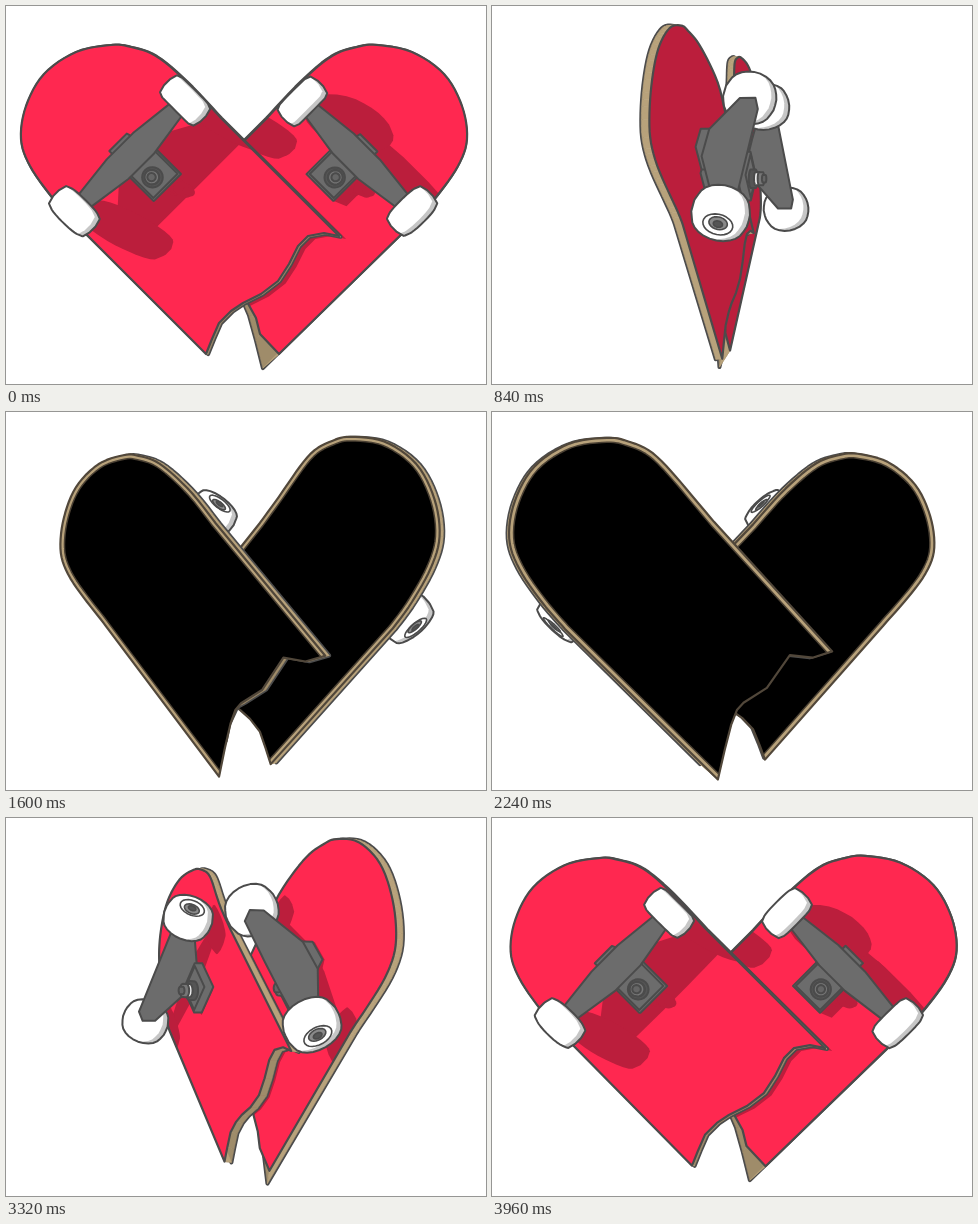
Animation, 480 px wide and 378 px high, one loop 4 s. Source, as an HTML page with a canvas:

```html
<!DOCTYPE html>
<html lang="en">
<head>
<meta charset="utf-8">
<title>Broken board heart</title>
<style>
html, body { margin: 0; width: 100%; height: 100%; overflow: hidden; background: #fff; }
canvas { display: block; }
</style>
</head>
<body>
<canvas id="stage" width="480" height="378"></canvas>
<script>
const ctx = document.getElementById('stage').getContext('2d');
const LOOP = 4000, STEP = 40;
const CX = 238, CY = 190, CAMERA = 1200, THICK = 7;
const INK = '#4b4b4b', RED = '#ff2850', SHADE = '#bb1e3c', WOOD = '#b8a27b',
      SPLIT = '#9f8c6a', METAL = '#6c6c6c', GREY = '#c6c6c6';
const LIGHT = [-1.5, -0.6, 1];
let cos = 1, sin = 0;

// Outlines are given for the left board; the right one is mirrored.
const NOSE = [[215, 112], [180, 75], [150, 50], [125, 41], [105, 39], [70, 46], [38, 68],
  [20, 100], [15, 133], [24, 160], [45, 190], [67, 215]];
const LEFT_BREAK = [[200, 348], [206, 333], [213, 317], [225, 305], [237, 297], [255, 288],
  [272, 275], [283, 258], [292, 240], [302, 230], [318, 227], [333, 230]];
const RIGHT_TAIL = [[246, 289], [271, 275], [296, 243], [321, 246], [343, 240]];
const RIGHT_FRONT = [[203, 348], [222, 328], [226, 312], [236, 294], ...RIGHT_TAIL];
const RIGHT_BACK = [[219, 363], [226, 335], [233, 310], [239, 296], ...RIGHT_TAIL];

function smooth(pts, n = 6) {
  const out = [];
  for (let i = 0; i < pts.length - 1; i++) {
    const p = [i - 1, i, i + 1, i + 2].map(k => pts[Math.min(pts.length - 1, Math.max(0, k))]);
    for (let k = 0; k < n; k++) {
      const t = k / n;
      out.push([0, 1].map(d => 0.5 * (2 * p[1][d] + (p[2][d] - p[0][d]) * t
        + (2 * p[0][d] - 5 * p[1][d] + 4 * p[2][d] - p[3][d]) * t * t
        + (3 * p[1][d] - p[0][d] - 3 * p[2][d] + p[3][d]) * t * t * t)));
    }
  }
  return [...out, pts[pts.length - 1]];
}

// Deck surface height: flat, easing into a nose set back from the wheels.
function surface(board, x, y) {
  const t = Math.min(1, Math.max(0, (290 - (board.side * x + CX + y + CY)) / 140));
  return board.z - 12.5 * t * t * (3 - 2 * t);
}

function makeBoard(side, z, frontBreak, backBreak) {
  const board = { side, z, cut: frontBreak.length };
  const nose = smooth(NOSE);
  const place = depth => ([px, py]) => {
    const x = side * (px - CX), y = py - CY;
    const height = surface(board, x, y), unscale = 1 - height / CAMERA;
    return [x * unscale, y * unscale, height - depth];
  };
  board.front = [...frontBreak, ...nose].map(place(0));
  board.back = [...backBreak, ...nose].map(place(THICK));
  board.parts = makeTruck(board);
  return board;
}

// Truck space: a along the axle, b towards the break, h above the deck.
function makeTruck(board) {
  const at = (a, b, h) => [board.side * (-111 + (a + b) * Math.SQRT1_2),
    -39 + (b - a) * Math.SQRT1_2, board.z + h];
  const box = (a0, a1, b0, b1, h0, h1) => [h0, h1].flatMap(h =>
    [at(a0, b0, h), at(a1, b0, h), at(a1, b1, h), at(a0, b1, h)]);
  const circle = f => Array.from({ length: 24 }, (_, i) => {
    const t = i * Math.PI / 12;
    return f(Math.cos(t), Math.sin(t));
  });
  const disc = (r, h) => circle((u, v) => at(u * r, 29 + v * r, h));
  const post = (r, h0, h1, fill) => ({ pts: [...disc(r, h0), ...disc(r, h1)], fill });

  const parts = [
    { mid: at(0, 28, 3), layers: [
      { pts: box(-16, 22, 10, 46, 0, 9), fill: METAL },
      { pts: box(-14, 20, 12, 44, 9, 9), fill: METAL }] },
    { mid: at(0, 0, 18), layers: [
      { pts: box(-11, 13, -18, 10, 0, 26), fill: METAL },
      { pts: [...box(-68, -60, -7, 7, 25, 40), ...box(60, 68, -7, 7, 25, 40),
        ...box(-18, 18, -13, 13, 6, 36)], fill: METAL }] },
    { mid: at(0, 29, 22), layers: [post(10, 9, 14, '#555'), post(7, 14, 18, '#eee'),
      post(7, 18, 22, '#777'), post(4, 22, 25, '#666')] }
  ];
  for (const end of [-1, 1]) {
    const ring = (r, off) => circle((u, v) => at(end * (76 + off), u * r, 32 + v * r));
    parts.push({
      mid: at(end * 76, 0, 32), wheel: true, out: board.side * end,
      layers: [{ pts: [[18, -13.5], [23, -11.5], [25, -4], [25, 4], [23, 11.5], [18, 13.5]]
        .flatMap(([r, off]) => ring(r, off)), fill: '#fff' }],
      hub: [[13, 13.5, '#fff'], [8, 12, '#8a8a8a'], [4, 13, '#555']]
        .map(([r, off, fill]) => ({ pts: ring(r, off), fill }))
    });
  }
  return parts;
}

const left = makeBoard(1, 2, LEFT_BREAK, LEFT_BREAK.map(([x, y]) => [x + 2, y + 1]));
const right = makeBoard(-1, -9, RIGHT_FRONT, RIGHT_BACK);

const depth = ([x, , z]) => z * cos - x * sin;
function project(p) {
  const f = CAMERA / (CAMERA - depth(p));
  return [CX + (p[0] * cos + p[2] * sin) * f, CY + p[1] * f];
}

function hull(pts) {
  const sorted = [...pts].sort((p, q) => p[0] - q[0] || p[1] - q[1]);
  const half = list => {
    const out = [];
    for (const p of list) {
      while (out.length > 1) {
        const [o, q] = out.slice(-2);
        if ((q[0] - o[0]) * (p[1] - o[1]) - (q[1] - o[1]) * (p[0] - o[0]) > 0) break;
        out.pop();
      }
      out.push(p);
    }
    return out.slice(0, -1);
  };
  return [...half(sorted), ...half(sorted.reverse())];
}

function trace(pts, closed = true) {
  ctx.beginPath();
  pts.forEach(([x, y]) => ctx.lineTo(x, y));
  if (closed) ctx.closePath();
}
function fill(color) { ctx.fillStyle = color; ctx.fill(); }
function stroke(color, width) { ctx.strokeStyle = color; ctx.lineWidth = width; ctx.stroke(); }

function drawSolid({ pts, fill: color }, width = 2) {
  trace(hull(pts.map(project)));
  fill(color);
  stroke(INK, width);
}

function drawShadows(board) {
  const [lx, ly, lz] = LIGHT;
  const facing = lx * sin + lz * cos;
  const dx = -(lx * cos - lz * sin) / facing, dy = -ly / facing;
  const cast = ([x, y, z]) => {
    const h = z - board.z, sx = x + dx * h, sy = y + dy * h;
    return project([sx, sy, surface(board, sx, sy)]);
  };
  const casters = board === right ? [...right.parts, ...left.parts] : left.parts;
  for (const part of casters) for (const layer of part.layers) {
    trace(hull(layer.pts.map(cast)));
    fill(SHADE);
  }
  if (board === right) {
    trace(left.back.map(cast));
    fill(SHADE);
  }
}

function drawDeck(board) {
  const front = board.front.map(project), back = board.back.map(project);
  const showFront = cos > 0;
  const near = showFront ? front : back;
  trace(showFront ? back : front);
  stroke(INK, 4);
  front.forEach((p, i) => {
    const j = (i + 1) % front.length;
    trace([p, front[j], back[j], back[i]]);
    const color = i < board.cut - 1 ? SPLIT : WOOD;
    fill(color);
    stroke(color, 0.6);
  });
  const lit = LIGHT[0] * sin + LIGHT[2] * cos > 0.02;
  trace(near);
  fill(showFront ? (lit ? RED : SHADE) : '#000');
  ctx.save();
  ctx.clip();
  if (showFront) {
    if (lit) drawShadows(board);
  } else {
    const rim = 1 + 7 * Math.abs(cos);
    trace([...near.slice(board.cut - 1), near[0]], false);
    stroke('#4a4033', rim + 3);
    stroke(WOOD, rim);
  }
  ctx.restore();
  trace(near);
  stroke(showFront ? INK : '#51473a', 2.2);
}

function drawPart(part) {
  if (!part.wheel) {
    part.layers.forEach(layer => drawSolid(layer));
    return;
  }
  const shape = hull(part.layers[0].pts.map(project));
  trace(shape);
  fill(GREY);
  ctx.save();
  ctx.clip();
  trace(shape.map(([x, y]) => [x - 5, y - 2]));
  fill('#fff');
  ctx.restore();
  trace(shape);
  stroke(INK, 2);
  if (-part.out * sin > 0.08) part.hub.forEach(layer => drawSolid(layer, 1.6));
}

function draw(time) {
  const angle = time / LOOP * 2 * Math.PI;
  cos = Math.cos(angle);
  sin = Math.sin(angle);
  ctx.fillStyle = '#fff';
  ctx.fillRect(0, 0, 480, 378);
  const parts = [...left.parts, ...right.parts].sort((p, q) => depth(p.mid) - depth(q.mid));
  const drawTrucks = () => parts.forEach(drawPart);
  if (cos > 0) {
    drawDeck(right);
    drawDeck(left);
    drawTrucks();
  } else {
    drawTrucks();
    drawDeck(left);
    drawDeck(right);
  }
}

ctx.lineJoin = 'round';
const start = performance.now();
function frame() {
  const time = (performance.now() - start) % LOOP;
  draw(Math.floor(time / STEP) * STEP);
  requestAnimationFrame(frame);
}
frame();
</script>
</body>
</html>
```
